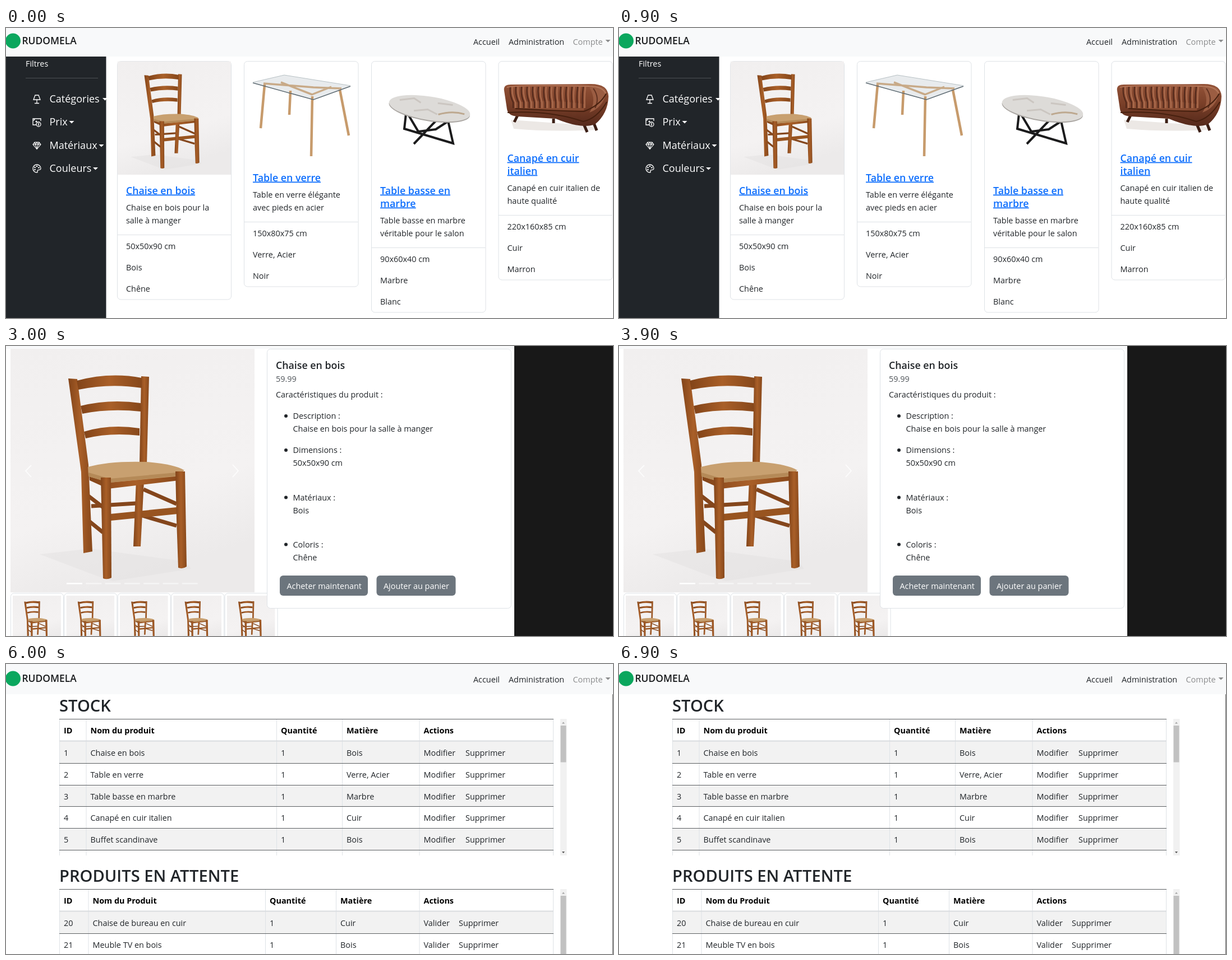
These frames come from a looping animation (1082x518 px, 7500 ms). An HTML page:

```html
<!DOCTYPE html>
<html lang="fr">
<head>
<meta charset="utf-8">
<title>Boutique de meubles</title>
<style>
  html, body { margin: 0; width: 100%; height: 100%; overflow: hidden; background: #fff; }
  svg { display: block; width: 1082px; height: 518px; }
  text { font-family: "Open Sans", "Noto Sans", sans-serif; white-space: pre; }
</style>
</head>
<body>
<svg id="stage" viewBox="0 0 1082 518">
  <defs>
    <linearGradient id="studio" x2=".3" y2="1">
      <stop offset="0" stop-color="#f1efef"/><stop offset=".7" stop-color="#f4f2f2"/><stop offset="1" stop-color="#eceaea"/>
    </linearGradient>
    <linearGradient id="wood" x2="1">
      <stop offset="0" stop-color="#824419"/><stop offset=".5" stop-color="#a95f28"/><stop offset="1" stop-color="#87481b"/>
    </linearGradient>
    <linearGradient id="leather" x2="0" y2="1">
      <stop offset="0" stop-color="#935338"/><stop offset=".45" stop-color="#7b4029"/><stop offset="1" stop-color="#55291b"/>
    </linearGradient>

    <symbol id="chair" viewBox="8 5 435 435">
      <path d="M8 5h435v435H8z" fill="url(#studio)"/>
      <path d="M60 372L150 362L320 385L330 398L190 420L160 410Z" fill="#e4e1e1" opacity=".5"/>
      <g fill="none" stroke="#84461c">
        <path d="M147 268L173 288M147 312L173 333M245 256L304 282M243 303L304 321M152 286L232 281" stroke-width="7"/>
        <path d="M186 306L305 294" stroke="#985420" stroke-width="12"/>
      </g>
      <g fill="url(#wood)">
        <path d="M232 240H246L240 358H227Z"/>
        <path d="M111 58L127 59L147 212L154 367L138 370L134 225Z"/>
        <path d="M241 54L255 55L251 212H238Z"/>
        <path d="M126 62Q185 46 242 57V75Q185 66 129 78Z"/>
        <path d="M133 107Q185 94 240 102V117Q185 111 136 121Z"/>
        <path d="M139 153Q185 139 238 147V160Q185 154 142 165Z"/>
        <path d="M148 228L180 238L317 225V239L182 255L149 240Z"/>
      </g>
      <path d="M146 216Q185 205 250 207Q300 211 318 222L302 233L185 244L147 233Z" fill="#c8a070"/>
      <path d="M147 226L185 237L304 226V232L185 244L147 233Z" fill="#b58a58"/>
      <g fill="url(#wood)">
        <path d="M169 235H187L188 414Q180 418 173 415Z"/>
        <path d="M302 224H319L322 394Q315 399 307 396L304 310Z"/>
      </g>
    </symbol>

    <g id="glassTable" fill="none">
      <path d="M440 97L496 84L614 103L548 127Z" fill="#e8ebed"/>
      <path d="M459 99L548 106L598 108M490 97L546 119M545 119L580 105" stroke="#c8aa88" stroke-width="3.500"/>
      <path d="M461 101L454 179M507 112L505 155M546 122L544 229M595 110L611 192" stroke="#c79b6c" stroke-width="4.500"/>
      <path d="M440 98L548 128L614 104" stroke="#5b6870" stroke-width="1.500"/>
      <path d="M440 97L496 84L614 103" stroke="#b7c0c4"/>
    </g>

    <g id="marbleTable" fill="none">
      <path d="M713 153L710 180L797 206L788 166M767 165L727 207M716 153L735 185L766 181L789 166" stroke="#1b1b1c" stroke-width="4"/>
      <g transform="rotate(9 755 144)">
        <ellipse cx="755" cy="145.500" rx="73" ry="21" fill="#a9a5a1"/>
        <ellipse cx="755" cy="143.500" rx="73" ry="21" fill="#dddbd8"/>
        <path d="M700 137L725 130L738 136M728 152L752 146L770 152M768 132L795 131" stroke="#cbc6c1" stroke-width="3"/>
        <path d="M772 152Q795 141 818 144" stroke="#bda88f" stroke-width="3"/>
      </g>
    </g>

    <path id="pleats"/>
    <g id="sofa" fill="none">
      <path d="M905 180Q970 186 1055 182L1040 174L900 164Z" fill="#ece8e5"/>
      <path d="M913 154L906 168M976 162V170M1030 172L1036 186M1047 168L1053 183" stroke="#3b1e14" stroke-width="5"/>
      <path d="M888 112Q886 101 900 101L1040 100Q1073 99 1074 122Q1073 153 1050 172Q1025 181 980 162L912 158Q895 157 893 145Z" fill="url(#leather)"/>
      <path d="M909 133Q970 126 1032 136L1030 147Q980 148 908 143Z" fill="#8a4d33"/>
      <use href="#pleats" x="4" stroke="#ab6b4d" stroke-width="2.500"/>
      <use href="#pleats" stroke="#4f271a" stroke-width="2"/>
      <path d="M1040 106Q1068 100 1070 116Q1064 142 1040 151Q1054 130 1040 106Z" fill="#9b5d42"/>
      <path d="M1047 108Q1059 125 1050 143" stroke="#5f301f" stroke-width="2"/>
      <path d="M908 144Q980 148 1030 149Q1058 139 1070 117M894 151Q970 147 1029 167Q1053 162 1071 132" stroke="#46200f" stroke-width="2"/>
      <path d="M893 106Q910 101 1040 104Q1063 104 1069 117" stroke="#b4775a" stroke-width="2"/>
    </g>

    <g id="foldingChair" fill="none">
      <path d="M383 142L371 204M437 103L419 186M374 185L427 166M413 197L468 182" stroke="#343536" stroke-width="4"/>
      <path d="M375 78L381 108L424 229M433 82L437 107L471 205" stroke="#252627" stroke-width="5"/>
      <path d="M376 140Q398 130 455 132Q467 132 465 140Q453 147 410 153Q392 151 376 145Z" fill="#dbe6e2"/>
      <path d="M376 146L410 153L464 141" stroke="#b6c4c0" stroke-width="2"/>
      <path d="M368 75Q382 67 428 69Q438 70 438 80L435 96Q408 100 380 104Q373 101 368 75Z" fill="#dfe9e6"/>
      <path d="M387 76L399 75" stroke="#fff" stroke-width="5" stroke-linecap="round"/>
    </g>
  </defs>
</svg>

<script>
const SCENE_MS = 1500;
const INK = "#212529", BLUE = "#0d6efd", GREY = "#6c757d", LINE = "#dee2e6", DARK_LINE = "#5b5e61";

const rect = (x, y, w, h, fill, extra = "") =>
  `<rect x="${x}" y="${y}" width="${w}" height="${h}" fill="${fill}" ${extra}/>`;
const path = (d, stroke, width = 1, extra = "") =>
  `<path d="${d}" fill="none" stroke="${stroke}" stroke-width="${width}" ${extra}/>`;
const box = (x, y, w, h) => rect(x + .5, y + .5, w, h, "#fff", `rx="6" stroke="${LINE}"`);
const text = (x, y, label, { size = 14.4, fill = INK, weight = 400, extra = "" } = {}) =>
  `<text x="${x}" y="${y}" font-size="${size}" fill="${fill}" font-weight="${weight}" ${extra}>${label}</text>`;
const centered = (y, label, style = {}) => text(542, y, label, { ...style, extra: 'text-anchor="middle"' });
const caret = (x, y, fill) => `<path d="M${x} ${y}h9l-4.500 4.500z" fill="${fill}"/>`;
const image = (x, y, size) => `<use href="#chair" x="${x}" y="${y}" width="${size}" height="${size}"/>`;
const list = (items, draw) => items.map(draw).join("");

function navbar(height, x = 0, linkX = 833, hasCaret = true) {
  const base = height - 21.5;
  return rect(0, 0, 1082, height, "#f8f9fa") +
    `<circle cx="${x + 12.5}" cy="${height - 28}" r="13.500" fill="#0ba75e"/>` +
    text(x + 28.5, base - .5, "RUDOMELA", { size: 17.4, fill: "#191b1d", weight: 600 }) +
    text(linkX, base, "Accueil") +
    text(linkX + 63, base, "Administration") +
    text(linkX + 177.5, base, "Compte", { fill: "#8b8c8d" }) +
    (hasCaret ? caret(1068.5, base - 8.5, "#8b8c8d") : "");
}

function card(x, y, w, base, titles, lines, details, picture) {
  const left = x + 16;
  const lead = base + 23 * titles.length + 6;
  const rule = Math.round(lead + 44) - .5;
  return box(x, y, w, rule + 115 - y) + picture +
    list(titles, (t, i) => text(left, base + 23 * i, t,
      { size: 17.8, fill: BLUE, weight: 600, extra: 'text-decoration="underline"' })) +
    list(lines, (t, i) => text(left, lead + 23 * i, t)) +
    path(`M${x} ${rule}h${w}`, LINE) +
    list(details, (t, i) => text(left, rule + 25.5 + 37.8 * i, t));
}

const woodenChair = ["50x50x90 cm", "Bois", "Chêne"];

function catalogue() {
  const filters = [["Catégories", 133, 172], ["Prix", 174, 112.5], ["Matériaux", 216, 165.5], ["Couleurs", 257, 155]];
  const icons =
    path("M52 120h6l3 8H49zM55 128v6M51 134.500h8", "#fff", 1.3) +
    path("M56 173h-8v-11h14v4M48 165q3 0 3-3", "#fff", 1.3) +
    `<circle cx="58" cy="172" r="4" fill="${INK}" stroke="#fff" stroke-width="1.300"/><circle cx="54" cy="167" r="1.500" fill="#fff"/>` +
    path("M58 169.500v5M59.500 170.500h-2.500l2 3h-2.500", "#fff", .8) +
    path("M51 204h8l3 4-7 8.500-7-8.500zM48 208h14M51 204l1.500 4 2.500 8 2.500-8 1.500-4M52.500 208l2.500-4 2.500 4", "#fff", 1.1) +
    path("M62 251a7 7 0 1 0-7 7c2 0 1-2 1-3.500s6 0 6-3.500z", "#fff", 1.3) +
    list([[51.5, 253], [51.5, 249], [55, 247], [58.5, 249.5]],
      ([x, y]) => `<circle cx="${x}" cy="${y}" r="1.300" fill="#fff"/>`);
  return navbar(51) + rect(0, 51, 178.5, 467, INK) +
    text(35, 68.5, "Filtres", { fill: "#fff" }) + path("M35 89.500H164", "#4d5154") + icons +
    list(filters, ([label, y, x]) => text(77.5, y, label, { size: 18, fill: "#fff" }) + caret(x, y - 8, "#fff")) +
    card(198, 59, 203, 296.5, ["Chaise en bois"], ["Chaise en bois pour la", "salle à manger"],
      woodenChair, image(198.5, 59.5, 202.5)) +
    card(424, 59, 203.5, 273.5, ["Table en verre"], ["Table en verre élégante", "avec pieds en acier"],
      ["150x80x75 cm", "Verre, Acier", "Noir"], '<use href="#glassTable"/>') +
    card(651, 59, 203.5, 296.5, ["Table basse en", "marbre"], ["Table basse en marbre", "véritable pour le salon"],
      ["90x60x40 cm", "Marbre", "Blanc"], '<use href="#marbleTable"/>') +
    card(877.5, 59, 203, 238.5, ["Canapé en cuir", "italien"], ["Canapé en cuir italien de", "haute qualité"],
      ["220x160x85 cm", "Cuir", "Marron"], '<use href="#sofa"/>');
}

function signup() {
  const fields = [
    ["Nom", 128, 396, 141, "Nom"],
    ["Prénom", 202, 396, 215, "Prénom"],
    ["Email", 271.5, 399, 285, "contact@fictif.test"],
    ["Mot de passe", 353, 399, 366, ""],
    ["Valider mot de passe", 434.5, 399, 447, ""],
  ];
  return navbar(54, .5, 833.5) +
    centered(92, "Inscription", { size: 34.8, weight: 600 }) +
    list(fields, ([label, y, x, top, hint]) => centered(y, label) +
      box(x, top, 2 * (541.5 - x), 35) + text(x + 12, top + 23.5, hint, { fill: "#62676c" })) +
    rect(489, 498, 106, 48, GREY, 'rx="8"') +
    centered(526, "S'inscrire", { size: 18, fill: "#fff" });
}

function product() {
  const facts = [
    ["Description :", "Chaise en bois pour la salle à manger", 130],
    ["Dimensions :", "50x50x90 cm", 191],
    ["Matériaux :", "Bois", 275.5],
    ["Coloris :", "Chêne", 359.5],
  ];
  const button = (x, w, label) => rect(x, 410, w, 36, GREY, 'rx="6"') +
    text(x + 12.5, 434, label, { fill: "#fff" });
  return rect(0, 0, 906, 5, "#f8f9fa") + image(8, 5, 435) +
    path("M45 213L35 223L45 234M404 212L414 223L404 234", "#fff", 1.8, 'opacity=".8"') +
    list([0, 1, 2, 3, 4, 5, 6], i => rect(108 + 34.3 * i, 423, 28, 2.5, "#fff", `opacity="${i ? .5 : 1}"`)) +
    list([0, 1, 2, 3, 4], i => box(8 + 95.4 * i, 441, 94, 94) + image(12 + 95.4 * i, 446, 86)) +
    box(465, 5, 435, 463) +
    text(481, 40.5, "Chaise en bois", { size: 17.8, weight: 600 }) +
    text(481, 64, "59.99", { fill: "#50555a" }) +
    text(481, 92, "Caractéristiques du produit :") +
    list(facts, ([label, value, y]) => `<circle cx="499" cy="${y - 5}" r="3" fill="${INK}"/>` +
      text(511.5, y, label) + text(511.5, y + 23, value)) +
    button(488, 157, "Acheter maintenant") + button(660.5, 141, "Ajouter au panier") +
    rect(906, 0, 176, 518, "#181818");
}

function results() {
  return navbar(54, 2, 847, false) +
    card(19, 62, 251, 348, ["Chaise en bois"], ["Chaise en bois pour la salle à", "manger"],
      woodenChair, image(19.5, 62.5, 251)) +
    card(293.5, 62, 251, 268, ["Chaise pliante en", "plastique"],
      ["Chaise pliante en plastique pour", "une utilisation polyvalente"],
      ["45x45x80 cm", "Plastique", "Blanc"], '<use href="#foldingChair"/>');
}

function table(top, bottom, columns, secondAction, head, rows) {
  const height = bottom - top;
  const rowTop = i => Math.round(top + 40.3 + 38.7 * i);
  const cells = (values, y, style) =>
    list(values, (v, i) => text(i < 5 ? columns[i] + 8 : secondAction, y, v, style));
  return list(rows, (row, i) => (i % 2 ? "" : rect(95, rowTop(i), 881, 39, "#f2f2f2")) +
      cells(row, rowTop(i) + 26)) +
    list(columns, x => path(`M${x + .5} ${top}V${bottom}`, LINE)) +
    cells(head, top + 26, { weight: 700, fill: "#000" }) +
    path(`M95 ${top + .5}H976`, DARK_LINE) +
    path(`M95 ${top + 39.5}H976`, "#d9dcdf", 2) +
    list(rows, (_, i) => path(`M95 ${rowTop(i + 1) + .5}H976`, DARK_LINE)) +
    rect(988, top, 11.5, height, "#f1f1f1") +
    `<path d="M991 ${top + 8.5}h5l-2.500-3z" fill="#a3a3a3"/>`;
}

function administration() {
  const heading = (y, label) => text(95, y, label, { size: 29.1, weight: 600 });
  const stock = [
    ["Chaise en bois", "Bois"], ["Table en verre", "Verre, Acier"], ["Table basse en marbre", "Marbre"],
    ["Canapé en cuir italien", "Cuir"], ["Buffet scandinave", "Bois"],
  ].map(([name, material], i) => [i + 1, name, 1, material, "Modifier", "Supprimer"]);
  const pending = [["Chaise de bureau en cuir", "Cuir"], ["Meuble TV en bois", "Bois"]]
    .map(([name, material], i) => [i + 20, name, 1, material, "Valider", "Supprimer"]);
  return navbar(54) + heading(85, "STOCK") +
    table(98, 342, [95, 142.5, 482, 599, 736.5, 975], 819,
      ["ID", "Nom du produit", "Quantité", "Matière", "Actions"], stock) +
    rect(988.5, 110, 10, 65.5, "#c1c1c1") +
    '<path d="M991 335h5l-2.500 3z" fill="#505050"/>' +
    heading(388.5, "PRODUITS EN ATTENTE") +
    table(402, 518, [95, 146.5, 462, 588, 736.5, 975], 807,
      ["ID", "Nom du Produit", "Quantité", "Matière", "Actions"], pending) +
    rect(988.5, 414, 10, 104, "#c1c1c1") +
    rect(1081, 54, 1, 464, "#666");
}

const stage = document.getElementById("stage");
document.getElementById("pleats").setAttribute("d",
  Array.from({ length: 14 }, (_, i) => `M${899 + i * 10} 105q-2 14 ${5 - i * .5} 28v10`).join(""));

const scenes = [catalogue, signup, product, results, administration].map(draw => {
  const group = document.createElementNS(stage.namespaceURI, "g");
  group.innerHTML = draw();
  stage.append(group);
  return group;
});

function show() {
  const current = Math.floor(performance.now() / SCENE_MS) % scenes.length;
  scenes.forEach((scene, i) => { scene.style.display = i === current ? "" : "none"; });
  requestAnimationFrame(show);
}
show();
</script>
</body>
</html>
```
